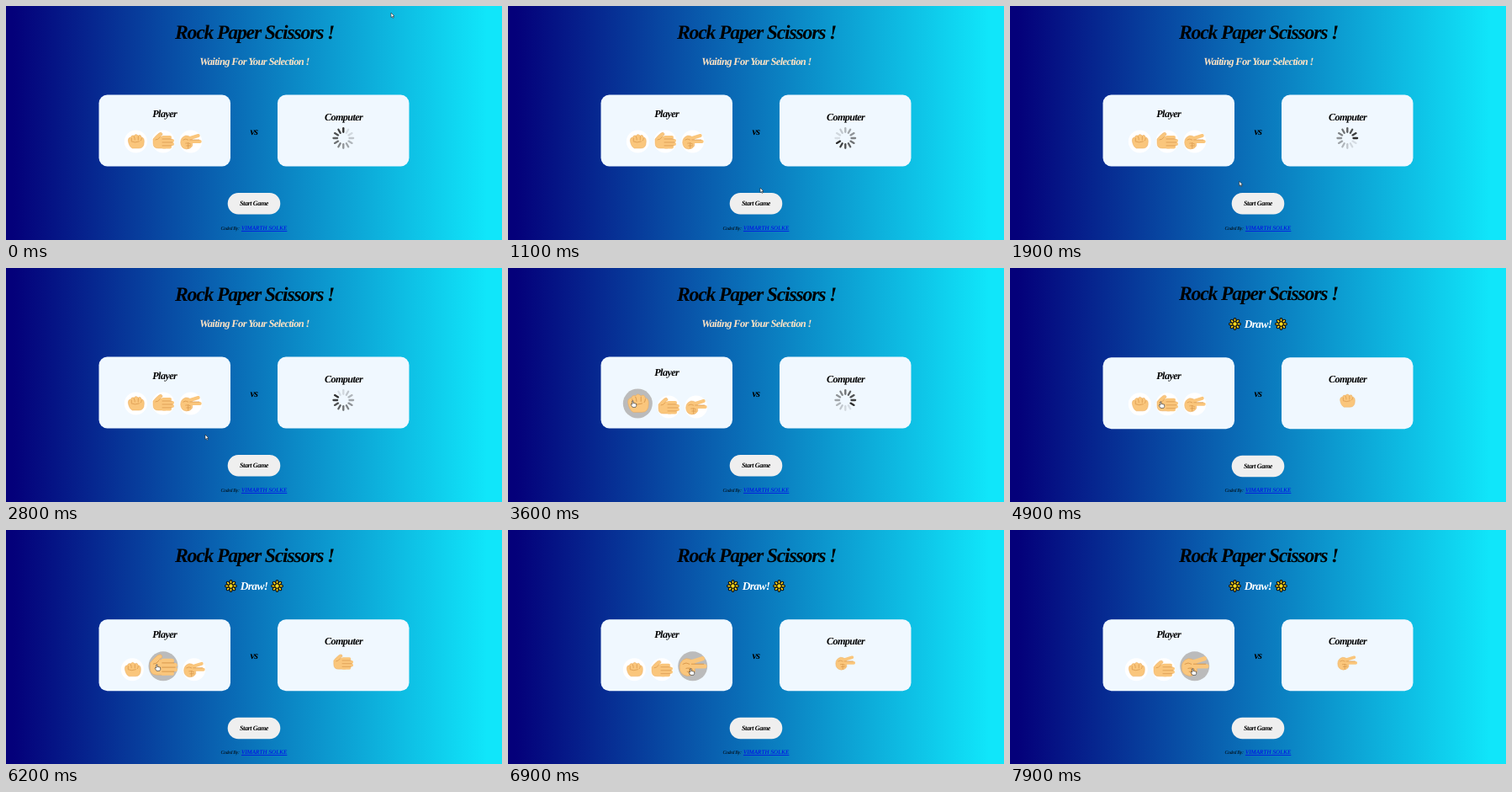
Animation, 590 px wide and 278 px high, one loop 8000 ms. Source, as an HTML page:

```html
<!DOCTYPE html>
<html lang="en">
<head>
<meta charset="utf-8">
<title>Rock Paper Scissors</title>
<style>
  html, body { margin: 0; width: 100%; height: 100%; overflow: hidden; background: #0a73bb; }
  svg { display: block; width: 590px; height: 278px; }
  text {
    font: italic bold 12.2px "Liberation Serif", "Times New Roman", serif;
    letter-spacing: -.05em; text-anchor: middle; text-rendering: geometricPrecision;
  }
  #title { font-size: 23.7px; }
  #wait { font-size: 12.5px; fill: #ffe4c4; }
  #draw text { font-size: 13.5px; fill: #fff; }
  #start { font-size: 8.1px; }
  .credit { font-weight: normal; font-size: 5.8px; text-anchor: start; }
  .link { font-size: 7px; letter-spacing: .1px; fill: #00e; text-decoration: underline; }
  .skin { fill: #fac67c; stroke: #e9ad62; stroke-width: .5; }
  .finger { stroke: #fac67c; stroke-width: 4; stroke-linecap: round; fill: none; }
  .crease { stroke: #d69448; stroke-width: .7; stroke-linecap: round; fill: none; }
</style>
</head>
<body>
<svg viewBox="0 0 590 278">
  <defs>
    <linearGradient id="sky">
      <stop offset=".015" stop-color="#04007a"/>
      <stop offset=".97" stop-color="#10e6fa"/>
    </linearGradient>
    <g id="rock">
      <path class="skin" d="M-9-1Q-9-5-6-5Q-5-8-2-7Q0-10 3-7Q6-9 7-5Q10-5 10 0Q10 8 4 8H-4Q-8 6-9-1Z"/>
      <path class="crease" d="M-5-4V-1M-2-6Q-1-4-1-2M3-6V-2M7-4Q7-2 6-1M-5 0Q-1 2 4 0"/>
    </g>
    <g id="paper">
      <path class="skin" d="M-12-3Q-9-7-5-10Q-1-12-1-8L-4-6H3V8H-6Q-12 8-12 2Z"/>
      <path class="finger" d="M0-5H8M0-1H11M0 3H11M0 6.5H8"/>
      <path class="crease" d="M-1-3H10M-1 1H11M-1 4.9H10M-9-2Q-6-2-4-5"/>
    </g>
    <g id="scissors">
      <path class="skin" d="M-12 1Q-12-5-6-7Q0-7 2-2V5Q0 9-5 9Q-12 8-12 1Z"/>
      <path class="finger" d="M-4-3L9-7M-3 0H11"/>
      <path class="crease" d="M-1-2L10-2M-6 2Q-2 1 0 3M-5 5H0M-3 2V8M-9-2Q-6-4-3-2"/>
    </g>
    <g id="star" stroke="#111" stroke-width="1.1"></g>
  </defs>

  <rect width="590" height="278" fill="url(#sky)"/>
  <text id="title" x="295.5" y="38.5">Rock Paper Scissors !</text>
  <text id="wait" x="295.5" y="70">Waiting For Your Selection !</text>
  <g id="draw">
    <text x="295" y="71">Draw!</text>
    <use href="#star" x="267.5" y="66.5"/>
    <use href="#star" x="322.5" y="66.5"/>
  </g>

  <g id="board">
    <g fill="#f0f8ff">
      <rect x="110.5" y="105.5" width="156.5" height="85" rx="10"/>
      <rect x="323" y="105.5" width="156.5" height="85" rx="10"/>
    </g>
    <text id="player" x="188.7">Player</text>
    <text x="401.5" y="135.7">Computer</text>
    <text x="295" y="152.5">vs</text>
    <g id="choices"></g>
    <g id="spinner" transform="translate(401.3 157)" stroke="#222" stroke-width="2.3" stroke-linecap="round"></g>
    <use id="reply" transform="translate(401 157) scale(.93)"/>
    <rect x="263.7" y="222" width="62.6" height="25.5" rx="12.7" fill="#efefef"/>
    <text id="start" x="295" y="237.3">Start Game</text>
  </g>
  <text class="credit" x="255.5" y="265.7">Coded By:</text>
  <text class="credit link" x="280" y="266">VIMARTH SOLKE</text>

  <g id="cursor" fill="#fff" stroke="#222" stroke-width=".6" stroke-linejoin="round">
    <path id="arrow" d="M0 0V5.5L1.3 4.4L2.2 6.4L3.2 5.9L2.3 4H4Z"/>
    <path id="pointer" d="M-1.2 0Q-.6-.8 0 0V2.4L3.6 3.2Q4.2 6 2.8 7.4H-.8L-3 4.2Q-2.6 3.2-1.2 4Z"/>
  </g>
</svg>
<script>
const $ = id => document.getElementById(id);
const LOOP = 8000, DRAW_AT = 4200;
const kinds = ["rock", "paper", "scissors"];
const hovers = [[3300, 4700], [4900, 6450], [6600, 9000]];
const replies = [[DRAW_AT, "rock"], [5900, "paper"], [6900, "scissors"]];
const path = [ // time, x, y
  [0, 458, 8], [200, 458, 8], [1000, 300, 216], [1400, 300, 216],
  [2500, 237, 198], [2850, 237, 198], [3500, 149, 158], [4500, 149, 158],
  [4850, 180, 159], [6300, 180, 160], [6750, 218, 165], [LOOP, 218, 165]
];

function add(parent, tag, attrs) {
  const el = document.createElementNS("http://www.w3.org/2000/svg", tag);
  for (const key in attrs) el.setAttribute(key, attrs[key]);
  return parent.appendChild(el);
}

for (let i = 0; i < 8; i++)
  add($("star"), "ellipse", { cy: -4.3, rx: 1.5, ry: 2.6, fill: "#ffd91a", transform: `rotate(${i * 45})` });
add($("star"), "circle", { r: 2.7, fill: "#ffd91a" });

const spokes = Array.from({ length: 12 }, (_, i) =>
  add($("spinner"), "path", { d: "M0-7.2V-11.8", transform: `rotate(${i * 30})` }));

const choices = kinds.map(kind => {
  const group = add($("choices"), "g", {});
  const disc = add(group, "circle", { r: 13.5 });
  add(group, "use", { href: "#" + kind });
  return { group, disc };
});

const clamp = v => Math.max(0, Math.min(1, v));
const ease = v => v * v * (3 - 2 * v);
const show = (id, on) => $(id).setAttribute("display", on ? "inline" : "none");
const move = (el, x, y, s = 1) => el.setAttribute("transform", `translate(${x} ${y}) scale(${s})`);

function placeChoices(t) {
  const grow = hovers.map(([a, b]) => ease(clamp((t - a) / 200)) - ease(clamp((t - b) / 200)));
  const sizes = grow.map(g => 27 + 8 * g);
  const lift = (Math.max(...sizes) - 27) / 2;
  const gap = 5.7;
  let x = 187 - (sizes[0] + sizes[1] + sizes[2]) / 2 - gap;
  choices.forEach(({ group, disc }, i) => {
    const shade = 255 - 68 * grow[i];
    move(group, x + sizes[i] / 2, 174.5 + lift - sizes[i] / 2, sizes[i] / 27);
    disc.setAttribute("fill", `rgb(${shade},${shade},${shade})`);
    x += sizes[i] + gap;
  });
  $("player").setAttribute("y", 131.7 - lift);
}

function placeCursor(t) {
  const i = path.findIndex(p => p[0] > t);
  const [t0, x0, y0] = path[i - 1], [t1, x1, y1] = path[i];
  const k = ease((t - t0) / (t1 - t0));
  move($("cursor"), x0 + (x1 - x0) * k, y0 + (y1 - y0) * k);
  const over = hovers.some(([a, b]) => t >= a && t < b);
  show("pointer", over);
  show("arrow", !over);
}

function render(t) {
  const drawn = t >= DRAW_AT;
  show("wait", !drawn);
  show("draw", drawn);
  show("spinner", !drawn);
  show("reply", drawn);
  move($("title"), 0, drawn ? -.8 : 0);
  move($("board"), 0, drawn ? .8 : 0);
  const reply = replies.filter(r => t >= r[0]).pop();
  if (reply) $("reply").setAttribute("href", "#" + reply[1]);
  const head = Math.floor(t / 125);
  spokes.forEach((spoke, i) => {
    const age = ((head - i) % 12 + 12) % 12;
    spoke.setAttribute("stroke-opacity", Math.max(.12, .95 - age * .08));
  });
  placeChoices(t);
  placeCursor(t);
}

const begin = performance.now();
function tick() {
  render((performance.now() - begin) % LOOP);
  requestAnimationFrame(tick);
}
tick();
</script>
</body>
</html>
```
